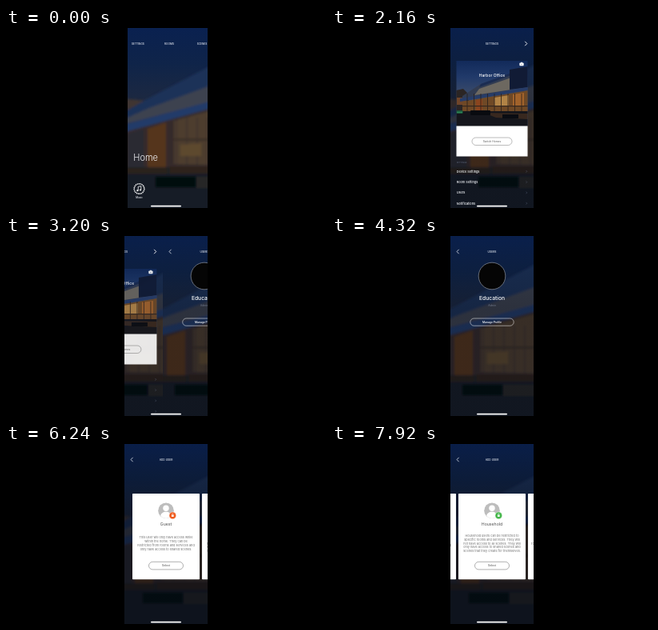
Animation of 400 by 225 pixels, one loop 8000 ms. Source, as an HTML page:

```html
<!DOCTYPE html>
<html lang="en">
<head>
<meta charset="utf-8">
<title>Home control app</title>
<style>
html, body { margin: 0; width: 100%; height: 100%; overflow: hidden; background: #000; }
svg { display: block; width: 400px; height: 225px; }
text { font-family: Inter, "Open Sans", sans-serif; }
</style>
</head>
<body>
<svg id="stage" viewBox="0 0 400 225"></svg>
<script>
const LOOP = 8000, WIDTH = 104, PITCH = 87;

const label = (s, x, y, size, fill = '#fff', anchor = 'middle', weight = 400) =>
  `<text x="${x}" y="${y}" font-size="${size}" fill="${fill}" text-anchor="${anchor}" font-weight="${weight}">${s}</text>`;
const box = (x, y, w, h, fill, more = '') =>
  `<rect x="${x}" y="${y}" width="${w}" height="${h}" fill="${fill}" ${more}/>`;
const poly = (points, fill) => `<polygon points="${points}" fill="${fill}"/>`;
const disc = (x, y, r, fill, more = '') => `<circle cx="${x}" cy="${y}" r="${r}" fill="${fill}" ${more}/>`;
const line = (d, color, w) => `<path d="${d}" fill="none" stroke="${color}" stroke-width="${w}"/>`;
const title = s => label(s, 200, 20.8, 3.3, '#e4e8f0', 'middle', 500);
const back = line('M158.6 16.8l-2.5 2.7 2.5 2.7', '#e4e8f0', .8);
const pill = (s, x, y, w, h, color) =>
  box(x, y, w, h, 'none', `rx="${h / 2}" stroke="${color}" stroke-width=".5"`) +
  label(s, 200, y + h / 2 + 1.2, 3.3, color, 'middle', 500);

// Each pane shows the same blurred house, cropped and dimmed in its own way.
const pane = (id, crop, shade, body) => `<g id="${id}"><g clip-path="url(#screen)">
  <use href="#house" x="${crop}"/>
  ${box(148, 0, WIDTH, 225, 'url(#shade)', `opacity="${shade}"`)}${body}</g></g>`;

function mullions(x0, x1, step, y0, y1, color) {
  let d = '';
  for (let x = x0; x < x1; x += step) d += `M${x} ${y0}V${y1}`;
  return line(d, color, .8);
}

const house = `<g id="house">
  ${box(140, 0, 150, 225, 'url(#sky)')}
  <g filter="url(#soft)">
    ${poly('130,87 171,91 171,101 130,103', '#3f3430')}
    ${poly('130,113 170,90 290,27 290,90 130,128', '#1c3058')}
    ${poly('130,120 175,100 290,58 290,82 130,124', '#3c4250')}
    ${poly('130,125 290,81 290,91 130,135', '#233a69')}
    ${poly('130,134 290,90 290,182 130,176', '#352c2b')}
    ${poly('206,116 290,93 290,172 206,170', '#4d3d2e')}
    ${poly('173,126 196,118 196,178 173,176', '#55341f')}
    ${poly('148,132 168,126 168,174 148,174', '#2c2a31')}
    ${mullions(209, 285, 13, 112, 172, '#2b2726')}
    ${box(205, 138, 85, 3, '#3a2f26')}
    ${poly('214,146 240,144 240,160 214,160', '#5d482f')}
    ${box(130, 174, 160, 60, '#141a28')}
    ${box(130, 175, 68, 7, '#2b211d')}
    ${box(200, 173, 90, 9, '#2d241f')}
    ${box(234, 186, 56, 14, '#272527')}
  </g>
  <g filter="url(#edge)">${box(183, 186, 50, 13, '#05070c')}</g>
</g>`;

const photo = `<g clip-path="url(#photo)">
  ${box(155, 41, 90, 82, 'url(#dusk)')}
  <g filter="url(#fine)">
    ${poly('155,78 164,76 171,83 171,104 155,104', '#2b2524')}
    ${box(156, 87, 12, 9, '#70452a')}
    ${poly('163,85 186,70 224,57 224,78 163,90', '#323c52')}
    ${poly('184,76 224,62 224,77 178,84', '#6d6860')}
    ${poly('186,70 224,56 224,59 184,74', '#1b2c52')}
    ${poly('222,52 245,48 245,74 222,77', '#111b35')}
    ${poly('160,88 245,74 245,78 160,92', '#273c68')}
    ${poly('163,92 245,78 245,108 163,104', '#6f4926')}
    ${poly('180,90 188,89 188,105 180,104', '#8b451f')}
    ${poly('203,87 221,84 221,97 203,97', '#b18346')}
    ${poly('226,83 240,81 240,97 226,97', '#a1622b')}
    ${mullions(169, 245, 8.5, 82, 107, '#271f1c')}
    ${box(163, 97, 82, 1.2, '#35271e')}
    ${box(155, 104, 90, 19, '#15161c')}
    ${poly('190,106 245,107 245,114 205,112', '#38281f')}
    ${box(173, 103, 25, 6, '#090b10', 'rx="1"')}
    ${box(213, 108, 20, 5, '#0a0c12')}
    ${box(155.5, 103, 8, 4, '#1d5a3c', 'rx="1"')}
    ${line('M156 105.3h7', '#3da96d', .7)}
  </g>
</g>`;

const camera = box(234.4, 43.6, 5.2, 3.6, '#fff', 'rx=".7"') +
  box(236, 42.8, 2, 1.5, '#fff') + disc(237, 45.4, .7, '#8b98b4');

const rows = ['Device Settings', 'Room Settings', 'Users', 'Notifications'].map((s, i) => {
  const y = 180.6 + i * 13.3;
  return label(s, 155.7, y, 3.85, '#f4f6fa', 'start', 500) +
    line(`M242.5 ${y - 2.6}l1.3 1.3-1.3 1.3`, '#66708a', .4);
}).join('');

const settings = `<g id="menu">
  ${title('SETTINGS')}
  ${line('M241.2 16.8l2.6 2.7-2.6 2.7', '#fff', .9)}
  <g id="card">
    ${photo}${camera}
    ${label('Harbor Office', 200, 60.8, 5, '#fff', 'middle', 500)}
    ${box(155.5, 122.5, 89, 38, '#fff')}
    ${pill('Switch Homes', 175, 137, 50, 9.5, '#777')}
  </g>
  ${label('SETTINGS', 155.7, 169, 2.6, '#5d6578', 'start')}
  ${rows}
</g>`;

const home = `
  ${label('SETTINGS', 161, 20.8, 3.2, '#e4e8f0', 'middle', 500)}
  ${label('ROOMS', 200, 20.8, 3.2, '#e4e8f0', 'middle', 500)}
  ${label('SCENES', 241, 20.8, 3.2, '#e4e8f0', 'middle', 500)}
  ${label('Home', 155.3, 165.6, 11, '#f2f3f6', 'start', 300)}
  ${disc(162.5, 201, 6.3, 'none', 'stroke="#fff" stroke-width="1.5" stroke-dasharray="1.3 .7"')}
  ${line('M161.2 203.2v-4.8l3.6-.8v4.8', '#fff', .8)}
  ${disc(160.4, 203.2, 1.1, '#fff')}${disc(164, 202.5, 1.1, '#fff')}
  ${label('Music', 162.5, 213.3, 3, '#e8ebf2', 'middle', 500)}`;

const users = `
  ${back}${title('USERS')}
  ${disc(200, 50, 16.8, '#050505', 'stroke="#a4a9b4" stroke-width=".6"')}
  ${label('Education', 200, 80.4, 6.7, '#fff', 'middle', 500)}
  ${label('Admin', 200, 88, 3.2, '#737c90')}
  ${pill('Manage Profile', 172.8, 103, 54.4, 9.2, '#fff')}`;

function roleCard(name, badge, lines, i) {
  const top = 124.3 - (lines.length - 1) * 2.35;
  const body = lines.map((s, k) => label(s, 200, top + 1.2 + k * 4.7, 3.85, '#747474')).join('');
  return `<g transform="translate(${i * PITCH} 0)">
    ${box(158, 62, 84, 107.3, '#fff', 'rx=".8"')}
    ${disc(200, 83.3, 9.8, '#bdbdbd')}
    ${disc(200, 80.3, 3.7, '#fff')}
    <path d="M193.2 90.3c0-7.4 13.6-7.4 13.6 0a9.8 9.8 0 0 1-13.6 0" fill="#fff"/>
    ${disc(208.3, 89.4, 4.3, badge, 'stroke="#fff" stroke-width=".4"')}
    ${box(206.9, 88.7, 2.8, 2.2, '#fff', 'rx=".4"')}
    ${line('M207.5 89v-1.2a.8.8 0 0 1 1.6 0V89', '#fff', .5)}
    ${label(name, 200, 102, 5.2, '#4c4c4c')}
    ${body}
    ${pill('Select', 178.5, 147.3, 43, 9.6, '#606060')}
  </g>`;
}

const roles = [
  ['Guest', '#ee5a1c', ['This user will only have access while', 'within the home. They can be',
    'restricted from rooms and services and', 'only have access to shared scenes.']],
  ['Household', '#43b649', ['Household users can be restricted to', 'specific rooms and services. They will',
    'not have access to all scenes. They will', 'only have access to shared scenes and',
    'scenes that they create for themselves.']],
  ['Admin', '#3c86d8', ['Admin users have access to every', 'room, service and scene within the home.',
    'They can also manage users.']]
];

const addUser = back + title('ADD USER') +
  `<g id="deck">${roles.map((r, i) => roleCard(...r, i)).join('')}</g>`;

document.getElementById('stage').innerHTML = `
<defs>
  <clipPath id="screen"><rect x="148" y="0" width="${WIDTH}" height="225"/></clipPath>
  <clipPath id="photo"><rect x="155.5" y="41" width="89" height="82"/></clipPath>
  <linearGradient id="sky" x2="0" y2="1">
    <stop offset="0" stop-color="#0a2150"/><stop offset=".2" stop-color="#0f2449"/>
    <stop offset=".42" stop-color="#1e2940"/><stop offset="1" stop-color="#0d1930"/>
  </linearGradient>
  <linearGradient id="dusk" x2="0" y2="1">
    <stop offset="0" stop-color="#122a5a"/><stop offset=".25" stop-color="#213a6a"/>
    <stop offset=".5" stop-color="#3a4a69"/>
  </linearGradient>
  <linearGradient id="shade" x2="0" y2="1">
    <stop offset="0" stop-color="#060c1a" stop-opacity=".3"/>
    <stop offset=".4" stop-color="#060a14"/>
  </linearGradient>
  <filter id="soft"><feGaussianBlur stdDeviation="1.6"/></filter>
  <filter id="edge"><feGaussianBlur stdDeviation=".8"/></filter>
  <filter id="fine"><feGaussianBlur stdDeviation=".35"/></filter>
  ${house}
</defs>
<rect width="400" height="225" fill="#000"/>
<g clip-path="url(#screen)">
  ${pane('settings', 0, .3, settings)}
  ${pane('home', 0, 0, home)}
  ${pane('users', -20, .3, users)}
  ${pane('add', -12, .5, addUser)}
  ${box(181, 221.7, 38, 1.7, '#fff', 'rx=".85"')}
</g>`;

const el = {};
for (const id of ['home', 'settings', 'menu', 'card', 'users', 'add', 'deck']) el[id] = document.getElementById(id);
const shift = (id, x) => el[id].setAttribute('transform', `translate(${x.toFixed(3)} 0)`);
const show = (id, on) => { el[id].style.display = on ? '' : 'none'; };
const span = (t, start, end) => Math.min(1, Math.max(0, (t - start) / (end - start)));
const easeOut = k => 1 - (1 - k) ** 3;
const smooth = k => k * k * (3 - 2 * k);

function draw(t) {
  const open = easeOut(span(t, 960, 1235));
  const page = smooth(span(t, 2980, 3400));
  const push = easeOut(span(t, 5200, 5765));
  const swipe = smooth(span(t, 7120, 7670));

  const homeX = 4 + 100 * open;
  const lag = homeX - WIDTH;
  const settingsX = lag - WIDTH * page;
  // The menu trails its pane slightly near the end of the opening slide.
  const menuX = lag * (.3 + .7 * Math.min(1, -lag / 100));

  shift('home', homeX);
  shift('settings', settingsX);
  shift('menu', menuX - lag);
  el.card.setAttribute('opacity', 1 - .11 * Math.min(1, Math.abs(settingsX) / 7));
  shift('users', WIDTH * (1 - page) - .3 * WIDTH * push);
  shift('add', WIDTH * (1 - push));
  shift('deck', -PITCH * swipe);
  show('home', open < 1);
  show('settings', open > 0);
  show('users', page > 0);
  show('add', push > 0);
}

const begin = performance.now();
function tick() {
  draw((performance.now() - begin) % LOOP);
  requestAnimationFrame(tick);
}
tick();
</script>
</body>
</html>
```
